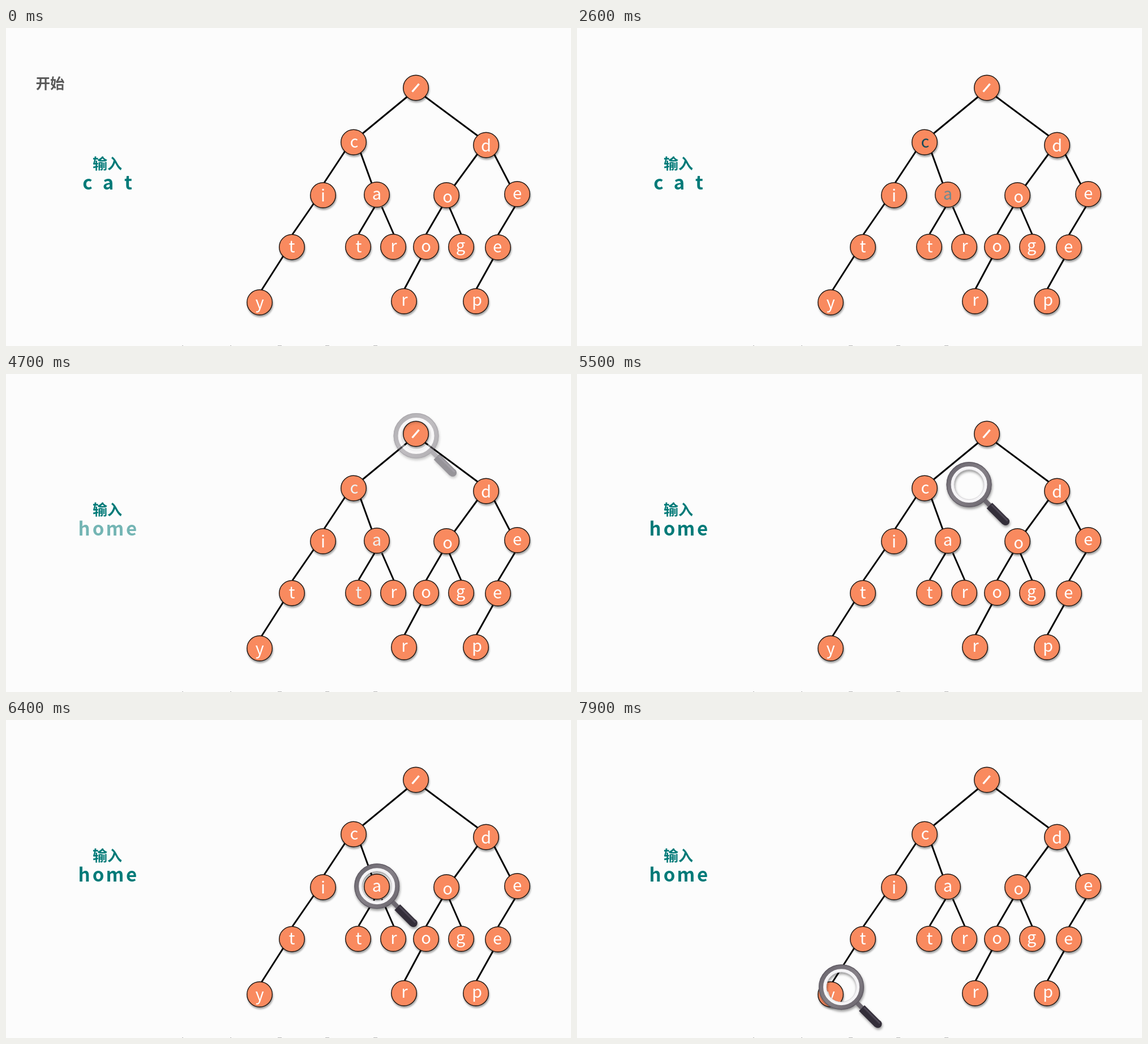
Recreate the animation shown at these times as an HTML page. Size 998 by 561 pixels, loop 8 s.

```html
<!DOCTYPE html>
<html lang="zh-CN">
<head>
<meta charset="utf-8">
<title>Trie search</title>
<style>
  html, body { margin: 0; width: 100%; height: 100%; overflow: hidden; background: #fcfcfc; }
  svg { display: block; width: 100%; height: 100%; }
  text { font-family: "Noto Sans CJK SC", "Noto Sans CJK", "Noto Sans", sans-serif; text-anchor: middle; }
  #nodes circle { fill: #f98a5f; stroke: #1c1410; stroke-width: 1.4; filter: drop-shadow(1px 3px 1.5px rgba(0,0,0,.36)); }
  #nodes text { font-size: 29px; font-weight: 500; fill: #fff; }
  #edges { stroke: #050505; stroke-width: 3; }
  .label { font-size: 26px; font-weight: 700; fill: #007a78; }
  .word { font-size: 33px; font-weight: 700; fill: #007a78; }
  #lens { filter: drop-shadow(1px 3px 2px rgba(0,0,0,.4)); }
</style>
</head>
<body>
<svg viewBox="0 0 998 561">
  <defs>
    <linearGradient id="rim" x1="0" y1="0" x2="1" y2="1">
      <stop offset="0" stop-color="#69656d"/>
      <stop offset=".5" stop-color="#858087"/>
      <stop offset="1" stop-color="#6b666e"/>
    </linearGradient>
  </defs>
  <rect width="998" height="561" fill="#fcfcfc"/>
  <text id="start" class="label" x="78" y="107" style="fill:#595959;font-size:25.5px">开始</text>
  <text class="label" x="179" y="248.500">输入</text>
  <text id="cat" class="word" x="144 163 180.500 199 216" y="285">c a t</text>
  <text id="home" class="word" x="138 163 192.500 221.500" y="285">home</text>
  <path id="edges"/>
  <g id="nodes"></g>
  <path id="specks" d="M311 560.500h2M396 560.500h2M480 560.500h7M564 560.500h7M649 560.500h7" stroke="#b5b5b5"/>
  <g id="lens" fill="none">
    <path d="M26 26L38 38" stroke="#6d6870" stroke-width="8"/>
    <path d="M36 37L64 65" stroke="#332e39" stroke-width="14"/>
    <circle cx="64.500" cy="65" r="7" fill="#332e39"/>
    <path d="M40 36L68 64" stroke="#4b4552" stroke-width="3"/>
    <circle r="29.500" stroke="#f5f4f6" stroke-width="6"/>
    <circle r="26.500" stroke="#d5d3d7"/>
    <circle r="36" stroke="url(#rim)" stroke-width="8"/>
    <circle r="39.300" stroke="#5f5a63" stroke-width="1.200"/>
  </g>
</svg>
<script>
const $ = id => document.getElementById(id);
const NS = 'http://www.w3.org/2000/svg';

function add(parent, tag, attrs, text = '') {
  const el = document.createElementNS(NS, tag);
  for (const k in attrs) el.setAttribute(k, attrs[k]);
  el.textContent = text;
  return parent.appendChild(el);
}

$('edges').setAttribute('d', `M709 121L630 186M740 121L833 190M599 217L562 273M626 219L646 274
  M833 222L792 278M862 222L890 276M544 309L506 364M651 316L623 363M664 316L685 364M770 316L742 364
  M783 316L804 364M899 315L869 365M490 402L451 463M734 404L704 460M860 408L831 460`);

// letter, circle centre, letter centre x and baseline
const tree = [
  ['c', 614, 201.5, 615, 211], ['d', 848, 206.5, 848, 218], ['i', 560, 295, 560, 305.5],
  ['a', 655, 294, 655, 303], ['o', 778, 295, 780, 307.5], ['e', 903, 293, 903, 302],
  ['t', 505, 386.5, 505, 396], ['t', 622, 386, 623, 396], ['r', 684, 386, 685, 395],
  ['o', 742, 386, 742, 395], ['g', 804, 386, 803, 393.5], ['e', 869, 387, 868, 396],
  ['y', 448, 484, 448, 494.5], ['r', 703, 482, 704, 490], ['p', 830, 482, 832, 490]
];
const nodes = $('nodes');
add(nodes, 'circle', { cx: 724, cy: 105.5, r: 22.3 });
const slash = add(nodes, 'path', { d: 'M717.5 112.5L729.500 98.500', 'stroke-width': 3.4 });
const letters = tree.map(([s, cx, cy, x, y]) => {
  add(nodes, 'circle', { cx, cy, r: 22.3 });
  return add(nodes, 'text', { x, y }, s);
});

const ramp = (t, from, to) => Math.min(1, Math.max(0, (t - from) / (to - from)));
const smooth = (t, from, to) => { const p = ramp(t, from, to); return p * p * (3 - 2 * p); };
const cubic = p => p < .5 ? 4 * p ** 3 : 1 - 4 * (1 - p) ** 3;
const tint = p => `rgb(${[23, 75, 90].map(c => Math.round(255 + (c - 255) * p))})`;

const stops = [[724.5, 109], [656.5, 292], [450, 483], [848, 207]];
const departures = [5010, 6283, 7680];

function draw(t) {
  $('start').style.opacity = 1 - ramp(t, 500, 1100);
  slash.style.stroke = tint(smooth(t, 650, 1250) - smooth(t, 1300, 1950));

  const reset = smooth(t, 4200, 4800);
  [[0, 1000, 1950], [3, 2000, 3000], [7, 2950, 4050]].forEach(([i, from, to]) =>
    letters[i].style.fill = tint(smooth(t, from, to) * (1 - reset)));

  $('cat').style.opacity = 1 - ramp(t, 4200, 4700);
  $('home').style.opacity = ramp(t, 4350, 5000);

  let [x, y] = stops[0];
  departures.forEach((start, i) => {
    const p = cubic(ramp(t, start, start + 1000));
    x += (stops[i + 1][0] - stops[i][0]) * p;
    y += (stops[i + 1][1] - stops[i][1]) * p;
  });
  $('lens').setAttribute('transform', `translate(${x} ${y})`);
  $('lens').style.opacity = ramp(t, 4400, 5000);
}

// The picture advances ten times a second.
function tick() {
  draw(Math.floor(performance.now() % 8000 / 100) * 100);
  requestAnimationFrame(tick);
}
tick();
</script>
</body>
</html>
```
